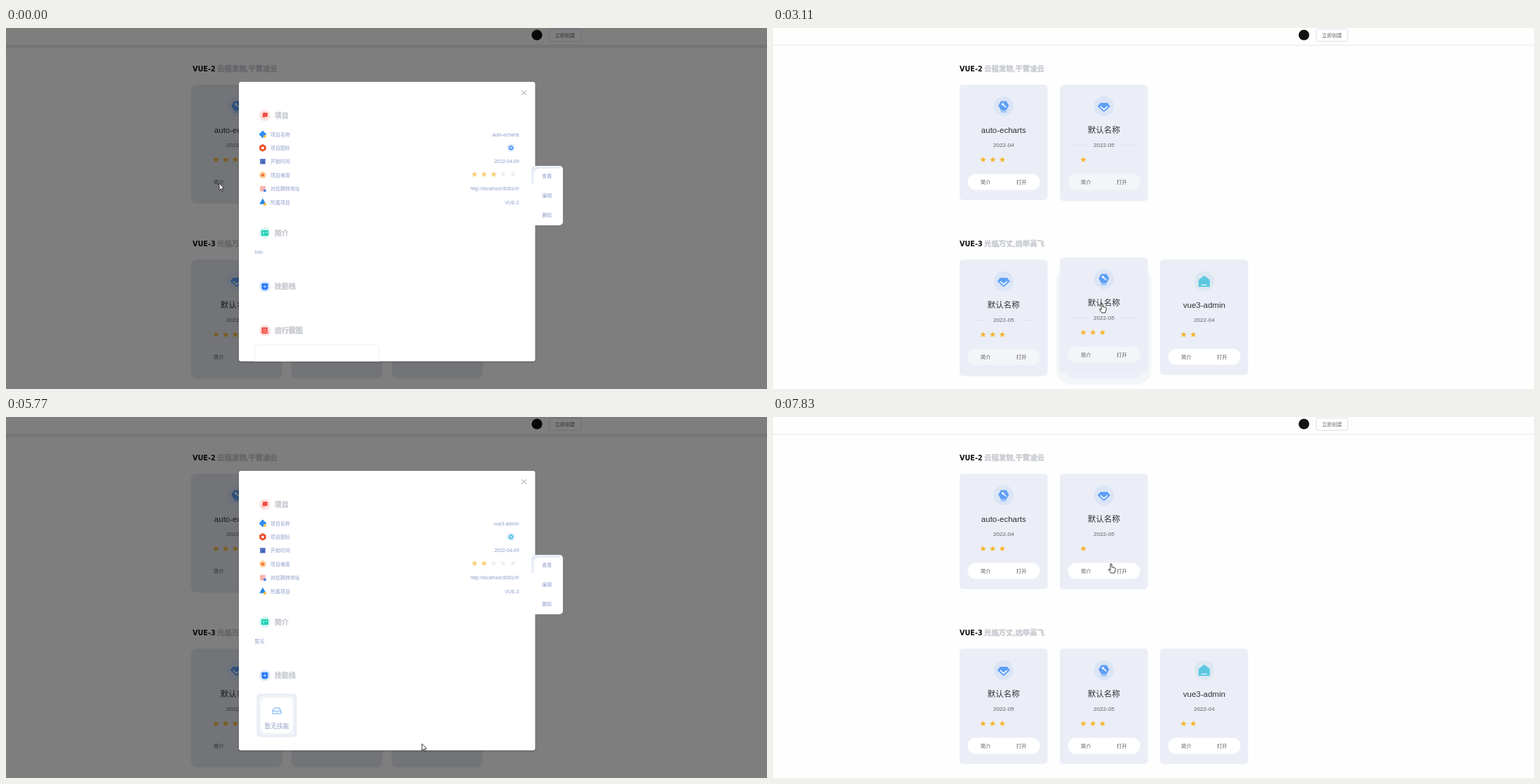
An HTML page with a canvas for the animation above (7.99 s loop, 1085 by 516 pixels).

```html
<!DOCTYPE html>
<html lang="zh">
<head>
<meta charset="utf-8">
<title>Project cards</title>
<style>
html, body { margin: 0; width: 100%; height: 100%; overflow: hidden; background: #fefefe; }
canvas { display: block; }
</style>
</head>
<body>
<canvas id="stage" width="1085" height="516"></canvas>
<script>
const ctx = document.getElementById('stage').getContext('2d');
const LOOP = 7990, BLUE = '#5d9ff5', TEAL = '#5cc8e0', LABEL = '#8c9dcb', HINT = '#c8cbd1';
const SANS = '"Liberation Sans", "Noto Sans CJK SC", "Noto Sans CJK", sans-serif';
const WIDE = '"DejaVu Sans", sans-serif';

// Each move: start, end, steps, and where the pointer arrives
const moves = [
  [0, 0, 1, 304, 222], [120, 910, 6, 865, 221], [1060, 1060, 1, 772, 215], [1200, 1480, 3, 470, 186],
  [1760, 2280, 5, 330, 400], [2830, 3110, 3, 469, 394], [3820, 4850, 8, 594, 467],
  [5380, 5770, 3, 593, 467], [6140, 6980, 7, 547, 257], [7280, 7830, 5, 482, 210]
];

const sections = [
  ['VUE-2', '云程发轫,干霄凌云', [['auto-echarts', '04', 3, 'tool'], ['默认名称', '05', 1, 'gem']]],
  ['VUE-3', '光焰万丈,远举高飞', [['默认名称', '05', 3, 'gem'], ['默认名称', '05', 3, 'tool'], ['vue3-admin', '04', 2, 'home']]]
];

// Field name, icon colour, accent, corners, turn, accent offset
const fields = [
  ['项目名称', '#2f8df2', '#f8c63d', 4, 0, 3],
  ['项目图标', '#ee4b23', '#fff', 6, 0, 0],
  ['开始时间', '#5573c4', '#3f5eb4', 4, .25, 1],
  ['项目难度', '#fdc98e', '#f26a3d', 5, .5, 0],
  ['对应跳转地址', '#f9b4ad', '#4a82e8', 4, .25, 3],
  ['所属项目', '#2488e8', '#f8b632', 3, .5, 3]
];

const mix = (a, b, p) => a + (b - a) * p;
const ramp = (t, start, length) => Math.max(0, Math.min(1, (t - start) / length));
const inside = (px, py, x, y) => px > x && px < x + 125 && py > y - 3 && py < y + 165;

// Time holds at the latest step of the latest move
function stateAt(now) {
  const i = moves.findLastIndex(m => now >= m[0]);
  const [start, end, n, toX, toY] = moves[i];
  const [, , , fromX, fromY] = moves[Math.max(0, i - 1)];
  const gap = (end - start) / Math.max(1, n - 1);
  const step = now >= end ? n - 1 : Math.floor((now - start) / gap + .001);
  const t = start + step * gap, p = (step + 1) / n;
  return {
    t, x: mix(fromX, toX, p), y: mix(fromY, toY, p),
    dim: .5 * (1 - ramp(t, 600, 340) + ramp(t, 5350, 200) - ramp(t, 7140, 400)),
    scroll: 174 * ramp(t, 6350, 500),
    second: t >= 5380,
    early: t >= 5380 && t < 5500,
    fresh: t > 7200
  };
}

function paint(fill, stroke) {
  if (fill) { ctx.fillStyle = fill; ctx.fill(); }
  if (stroke) { ctx.strokeStyle = stroke; ctx.stroke(); }
}

function rect(x, y, w, h, r, fill, stroke) {
  ctx.beginPath();
  ctx.roundRect(x, y, w, h, r);
  paint(fill, stroke);
}

function circle(x, y, r, fill) {
  ctx.beginPath();
  ctx.arc(x, y, r, 0, 7);
  paint(fill);
}

function poly(x, y, points, fill, stroke, open) {
  ctx.beginPath();
  for (let i = 0; i < points.length; i += 2) ctx.lineTo(x + points[i], y + points[i + 1]);
  if (!open) ctx.closePath();
  paint(fill, stroke);
}

// Regular polygon or star; turn counts in corners
function ring(x, y, n, r, fill, turn = 0, inner = r) {
  const points = [];
  for (let i = 0; i < n; i++) {
    const a = (i + turn * 2) * 2 * Math.PI / n - Math.PI / 2, d = i % 2 ? inner : r;
    points.push(d * Math.cos(a), d * Math.sin(a));
  }
  poly(x, y, points, fill);
}

const star = (x, y, color) => ring(x, y + .3, 10, 4.4, color, 0, 2);

function text(s, x, y, size, color, align = 'left', bold = false, family = SANS) {
  ctx.font = `${bold ? 700 : 400} ${size}px ${family}`;
  ctx.textAlign = align;
  ctx.fillStyle = ctx.strokeStyle = color;
  const base = Math.round(y + size * .37);
  ctx.fillText(s, x, base);
  if (bold && family === SANS) {
    ctx.lineWidth = .4;
    ctx.strokeText(s, x, base);
  }
}

function icon(kind, x, y) {
  circle(x, y, 14.2, kind === 'home' ? '#dbe7f1' : '#dbe5f6');
  ctx.lineWidth = 1.6;
  if (kind === 'tool') {
    rect(x - 4, y + 4, 8, 5, 1, '#a5c9fa');
    ring(x, y - 1, 6, 7.6, BLUE, .25);
    poly(x, y - 2, [-1, -1, 3, 3], null, '#fff');
    circle(x - 1.3, y - 3, 1.7, '#fff');
  } else if (kind === 'gem') {
    poly(x, y, [-5, -5, 5, -5, 9, 0, 1, 7.5, -1, 7.5, -9, 0], BLUE);
    poly(x, y, [-5, 0, 0, 4.6, 5, 0], null, '#fff', true);
  } else {
    poly(x, y, [0, -8, 8, -2, 8, 8, -8, 8, -8, -2], TEAL);
    rect(x - 4, y + 4.7, 8, 1.3, .6, '#e8f8fc');
  }
}

function card(x, y, [title, month, stars, kind], s) {
  const over = inside(s.x, s.y, x, y) && s.dim < .2 && !s.fresh;
  const used = !s.fresh && (over || moves.some(m => m[0] && m[1] <= s.t && inside(m[3], m[4], x, y)));
  const pale = s.dim < .06, faint = used || s.dim > 0;
  const fill = s.dim ? '#e6eaef' : '#ebeef6';
  if (!pale) {
    const spread = over ? 9 : 1 + 2.4 * s.dim;
    rect(x - spread, y, 125.5 + 2 * spread, over ? 183 : 168 + 4 * s.dim, over ? 24 : 8, fill);
  } else if (over) {
    rect(x - 5, y + 8, 135.5, 171, 22, '#f4f5f9');
    rect(x + 5, y + 60, 115.5, 110, 18, '#ecf0f8');
  } else if (faint) {
    rect(x, y + 20, 125.5, 147, 6, '#f0f2f6');
  }
  ctx.save();
  ctx.translate(x, over ? y - 3 : y);
  if (pale) rect(0, 0, 125.5, 165, 5, fill);
  icon(kind, 62.8, 31);
  text(title, 62.8, 65, 11.5, '#303133', 'center');
  text('2022-' + month, 62.8, 86.5, 8.1, '#606266', 'center');
  if (faint && s.dim < .2) for (const lineX of [19, 86]) rect(lineX, 86, 20.5, 1, 0, '#dde1e8');
  for (let i = 0; i < stars; i++) star(33.5 + 13.7 * i, 107, '#f5b52f');
  if (pale) rect(11.5, 127.5, 103, 23, 11.5, faint ? '#f4f5f9' : '#fff');
  text('简介', 30, 139, 7.2, '#55575c');
  text('打开', 81, 139, 7.2, '#55575c');
  ctx.restore();
}

function page(s) {
  ctx.fillStyle = '#fefefe';
  ctx.fillRect(0, 0, 1085, 516);
  rect(0, 24, 1085, 1, 0, '#e8e9eb');
  if (s.dim) rect(0, 25, 1085, s.dim < .06 ? 3 : 4, 0, '#ebedf0');
  circle(757, 10, 7.6, '#111');
  ctx.lineWidth = 1;
  rect(774.5, 1.5, 45, 17.5, 2, '#fff', '#dcdfe6');
  text('立即创建', 797, 10, 7.1, '#606266', 'center');
  sections.forEach(([name, motto, cards], row) => {
    const y = 81 + 250 * row;
    text(name, 266, y - 22.5, 9.7, '#111', 'left', true, WIDE);
    text(motto, 301, y - 22.5, 10.4, HINT, 'left', true);
    cards.forEach((c, i) => card(266 + 143 * i, y, c, s));
  });
}

function heading(name, y, tint, s) {
  if (!s.early) circle(369, y, 8, tint);
  text(name, 383, y, 10, HINT, 'left', !s.early);
}

function emptyBox(x, y) {
  poly(x, y, [-21, -8, -10, -19, 13, -20, 19, -13, 8, -8, -14, -2], '#eceef2');
  rect(x - 14, y - 4, 22, 24, 0, '#f0f1f5');
  poly(x, y, [8, -8, 19, 4, 19, 20, 8, 20], '#e2e4e9');
  rect(x + 9, y + 3, 14, 3, 0, '#dcdee4');
  rect(x - 23, y + 21, 46, 2, 1, '#f5f6f8');
}

function details(s) {
  const values = [s.second ? 'vue3-admin' : 'auto-echarts', '', '2022-04-09', '',
    'http://localhost:8081/#/', s.second ? 'VUE-3' : 'VUE-2'];
  fields.forEach(([name, color, accent, corners, turn, shift], i) => {
    const y = 152 + 19.4 * i;
    ring(366, y, corners, 5.4, color, turn);
    circle(366 + shift, y + shift, 2, accent);
    text(name, 377, y, 7, LABEL);
    if (!s.early) text(values[i], 731.5, y, 6.9, LABEL, 'right');
  });
  if (s.early) return;
  circle(720, 171.3, 5.8, '#e0ecfd');
  ring(720, 171.3, 6, 3.8, s.second ? TEAL : BLUE);
  circle(720, 171, 1.1, '#fff');
  for (let i = 0; i < 5; i++) star(668 + 13.7 * i, 209, i < (s.second ? 2 : 3) ? '#f9cf74' : '#eceef3');
}

function dialog(s) {
  const panel = s.early ? '#ececec' : '#fff';
  ctx.save();
  ctx.shadowColor = 'rgba(0,0,0,.35)';
  ctx.shadowBlur = 2;
  ctx.shadowOffsetY = 1;
  rect(332, 77, 422.5, 399.5, 3, panel);
  ctx.restore();

  ctx.save();
  ctx.beginPath();
  ctx.rect(332, 77, 422.5, 399.5);
  ctx.clip();
  ctx.translate(0, -s.scroll);
  ctx.lineWidth = .8;
  for (const d of [-3, 3]) poly(738.5, 92.5, [-3, d, 3, -d], null, '#8d9199');

  heading('项目', 125, '#fde4e1', s);
  rect(365, 124, 5, 5, 1, '#fbb0aa');
  rect(366, 121, 7, 6, 1, '#f34f48');
  details(s);

  heading('简介', 293, '#d5f7f1', s);
  rect(364, 289, 10, 8, 1, '#1fd0b4');
  rect(366, 291, 2.5, 4, 0, '#7ce8d7');
  rect(370, 291.5, 2.5, 1, 0, '#fff');
  if (!s.early) text(s.second ? '暂无' : 'hhh', 354.5, 320, 7, LABEL);

  const skillY = s.early ? 344.5 : 369.5;
  heading('技能栈', skillY, '#dbe8fd', s);
  rect(364.5, skillY - 4.5, 9, 9.5, [1, 1, 4, 4], '#2479fa');
  rect(366.5, skillY - .5, 5, 1, 0, '#b9d4ff');
  rect(368.5, skillY - 2.5, 1, 5, 0, '#b9d4ff');
  const filled = s.second && !s.early;
  if (filled) {
    ['#e9edf5', '#f2f4f9', '#fff'].forEach((color, i) =>
      rect(357.5 + 3 * i, 395.5 + 3 * i, 57 - 6 * i, 62 - 6 * i, 5 + i, color));
    ctx.lineWidth = 1;
    poly(386, 420, [-6, 0, -3.5, -4, 3.5, -4, 6, 0, 6, 4, -6, 4], null, '#65a8ee');
    poly(386, 420, [-6, 0, -2, 0, 0, 2, 2, 0, 6, 0], null, '#65a8ee', true);
    text('暂无技能', 386, 442, 8.8, '#8f9fc6', 'center');
  }

  const shotY = skillY + (filled ? 136.5 : 63);
  heading('运行截图', shotY, '#fde0de', s);
  rect(364.5, shotY - 4.5, 8.5, 9, 1, '#f2493f');
  for (let i = 0; i < 3; i++) rect(366, shotY - 2.5 + 2.2 * i, 5.5, .8, 0, '#fcc4c0');
  circle(373, shotY + 3, 1.8, '#f98f88');
  if (!s.early) {
    ctx.lineWidth = 1;
    rect(354.5, shotY + 20.5, 177, 133, 4, '#fff', '#eceef2');
    emptyBox(442, shotY + 83);
    text('暂无图片', 443, shotY + 120, 8, '#909399', 'center');
  }
  ctx.restore();

  rect(752, 197, 42, 85, s.early ? 0 : [0, 5, 5, 0], panel);
  if (!s.early) {
    rect(749, 197, 40, 27, [5, 0, 0, 4], '#e9edf6');
    rect(752.5, 201, 41.5, 25, [8, 4, 0, 0], '#fff');
  }
  ['查看', '编辑', '删除'].forEach((name, i) => text(name, 771.3, 211 + 28.4 * i, 7, LABEL, 'center'));
}

function cursor({ x, y, dim }) {
  const hand = !dim && sections.some(([, , cards], row) =>
    cards.some((c, i) => inside(x, y, 266 + 143 * i, 81 + 250 * row)));
  ctx.lineWidth = .9;
  ctx.lineJoin = 'round';
  const shape = hand
    ? [-1, 0, 1, 0, 1.2, 4.6, 5.5, 5.6, 6.5, 7, 4.8, 13, -.2, 13, -3.6, 8.4, -3, 7.4, -1, 8.8]
    : [0, 0, 0, 9.8, 2.3, 7.8, 3.9, 11.4, 5.3, 10.8, 3.8, 7.3, 6.6, 7];
  poly(x, y, shape, '#fff', '#222');
}

function draw(now) {
  const s = stateAt(now % LOOP);
  page(s);
  ctx.fillStyle = `rgba(0,0,0,${s.dim})`;
  ctx.fillRect(0, 0, 1085, 516);
  if (s.dim > .06) {
    ctx.globalAlpha = s.early ? 1 : Math.min(1, s.dim * 2);
    dialog(s);
    ctx.globalAlpha = 1;
  }
  cursor(s);
  requestAnimationFrame(time => draw(Math.max(0, time - begin)));
}

const begin = performance.now();
draw(0);
</script>
</body>
</html>
```
